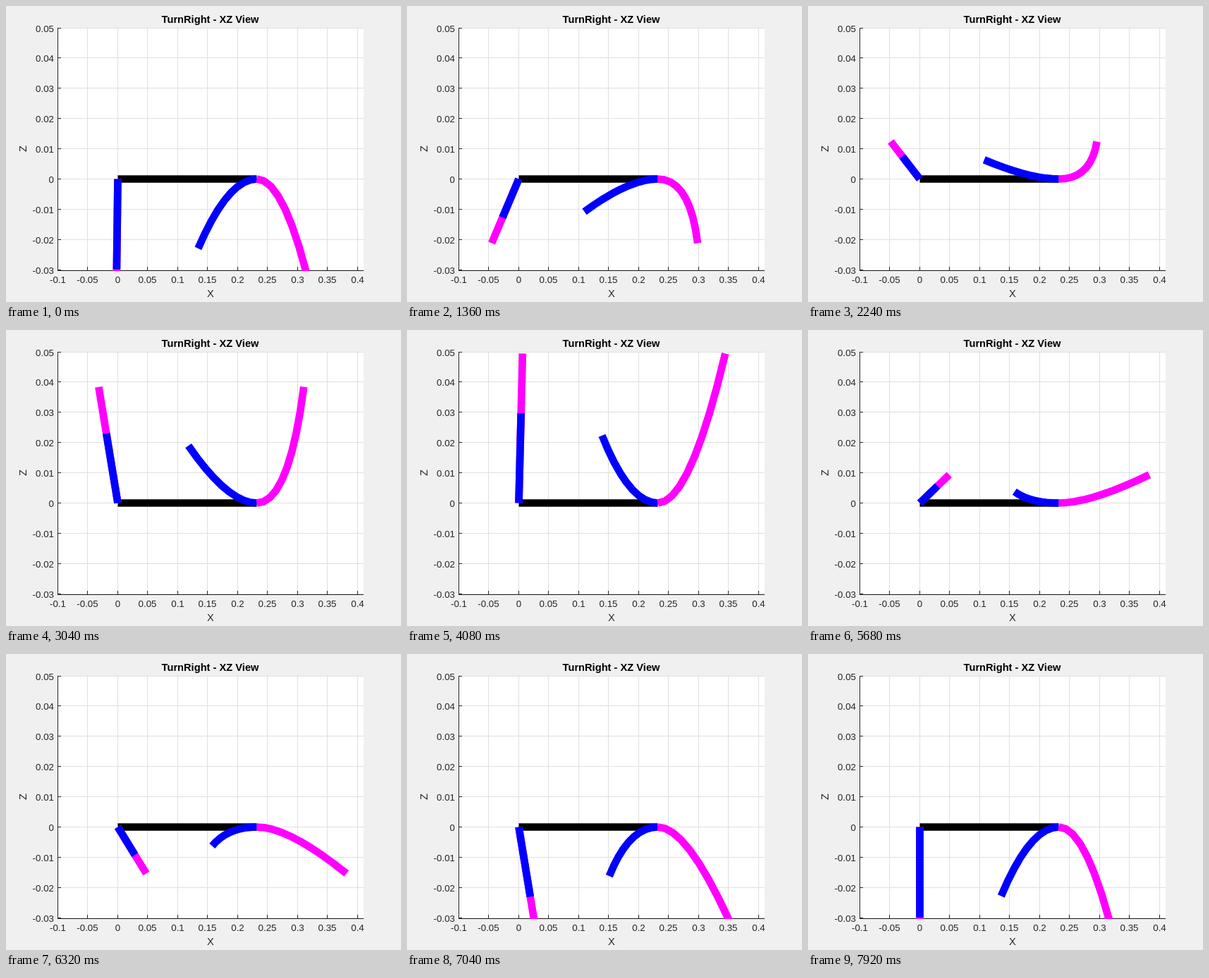
Animation, 560 px wide and 420 px high, one loop 8 s. Source, as an HTML page with a canvas:

```html
<!DOCTYPE html>
<html lang="en">
<head>
<meta charset="utf-8">
<style>
  html, body { margin: 0; width: 100%; height: 100%; overflow: hidden; background: #f0f0f0; }
  canvas { display: block; }
</style>
</head>
<body>
<canvas id="stage" width="560" height="420"></canvas>
<script>
const ctx = document.getElementById('stage').getContext('2d');
const LEFT = 73, TOP = 31, RIGHT = 507, BOTTOM = 375;
const ORIGIN = { x: 158.5, y: 245.5 }, JOINT = { x: 355.5, y: 245.5 };
const RX = 42.5, RZ = 213.8;              // 0.05 units along each axis, in pixels
const BLUE = '#00f', MAGENTA = '#f0f', INK = '#262626';
const STEP = 80, STEPS = 100, SEGMENTS = 9;

function rect(color, x, y, w, h) {
  ctx.fillStyle = color;
  ctx.fillRect(x, y, w, h);
}

function label(text, x, y, align, size = 13.33, color = INK, weight = '') {
  ctx.font = `${weight} ${size}px "Liberation Sans", Arial, sans-serif`;
  ctx.textAlign = align;
  ctx.fillStyle = color;
  ctx.fillText(text, x, y);
}

function drawAxes() {
  rect('#f0f0f0', 0, 0, 560, 420);
  rect('#fff', LEFT, TOP, RIGHT - LEFT, BOTTOM - TOP);
  const columns = Array.from({ length: 11 }, (_, i) => Math.floor(LEFT + 42.5 * i));
  const rows = Array.from({ length: 9 }, (_, i) => Math.floor(TOP + 42.875 * i));
  columns.forEach(x => rect('#dfdfdf', x, TOP, 1, BOTTOM - TOP));
  rows.forEach(y => rect('#dfdfdf', LEFT, y, RIGHT - LEFT, 1));
  columns.forEach((x, i) => {
    rect(INK, x, BOTTOM - 5, 1, 5);
    label(String((i - 2) * 5 / 100), x + 0.5, 393, 'center');
  });
  rows.forEach((y, i) => {
    rect(INK, LEFT, y, 5, 1);
    label(String((5 - i) / 100), 68, y + 5.5, 'right');
  });
  rect(INK, LEFT, TOP, 1, BOTTOM - TOP + 1);
  rect(INK, LEFT, BOTTOM, RIGHT - LEFT, 1);

  label('TurnRight - XZ View', 289.5, 24, 'center', 14.67, '#000', 'bold');
  label('X', 290, 413, 'center', 14.67);
  ctx.save();
  ctx.translate(29, 202.5);
  ctx.rotate(-Math.PI / 2);
  label('Z', 0, 0, 'center', 14.67);
  ctx.restore();
}

// A limb leaves its base along x by `reach` and bends quadratically by (bendX, bendY).
function limb(color, base, reach, bendX, bendY) {
  ctx.strokeStyle = color;
  ctx.beginPath();
  for (let i = 0; i <= SEGMENTS; i++) {
    const u = i / SEGMENTS;
    ctx.lineTo(base.x + reach * u + bendX * u * u, base.y + bendY * u * u);
  }
  ctx.stroke();
}

function draw(time) {
  const step = Math.floor(time / STEP) % STEPS + 1;
  const angle = 2 * Math.PI * step / STEPS;
  const s = Math.sin(angle), c = Math.cos(angle);

  drawAxes();
  ctx.save();
  ctx.beginPath();
  ctx.rect(LEFT, TOP - 1, RIGHT - LEFT, BOTTOM - TOP + 2);
  ctx.clip();
  ctx.lineWidth = 10.67;
  ctx.lineJoin = 'round';
  limb('#000', ORIGIN, JOINT.x - ORIGIN.x, 0, 0);
  limb(MAGENTA, ORIGIN, 0, -RX * s, RZ * c);
  limb(BLUE, ORIGIN, 0, -RX * 0.6 * s, RZ * 0.6 * c);
  limb(BLUE, JOINT, -81.7, -22.1 * s - 2.8 * s * s, (98 + 12 * s) * c);
  limb(MAGENTA, JOINT, 91, -38.1 * s, RZ * c);
  ctx.restore();
}

const start = performance.now();
function tick() {
  draw(performance.now() - start);
  requestAnimationFrame(tick);
}
tick();
</script>
</body>
</html>
```
